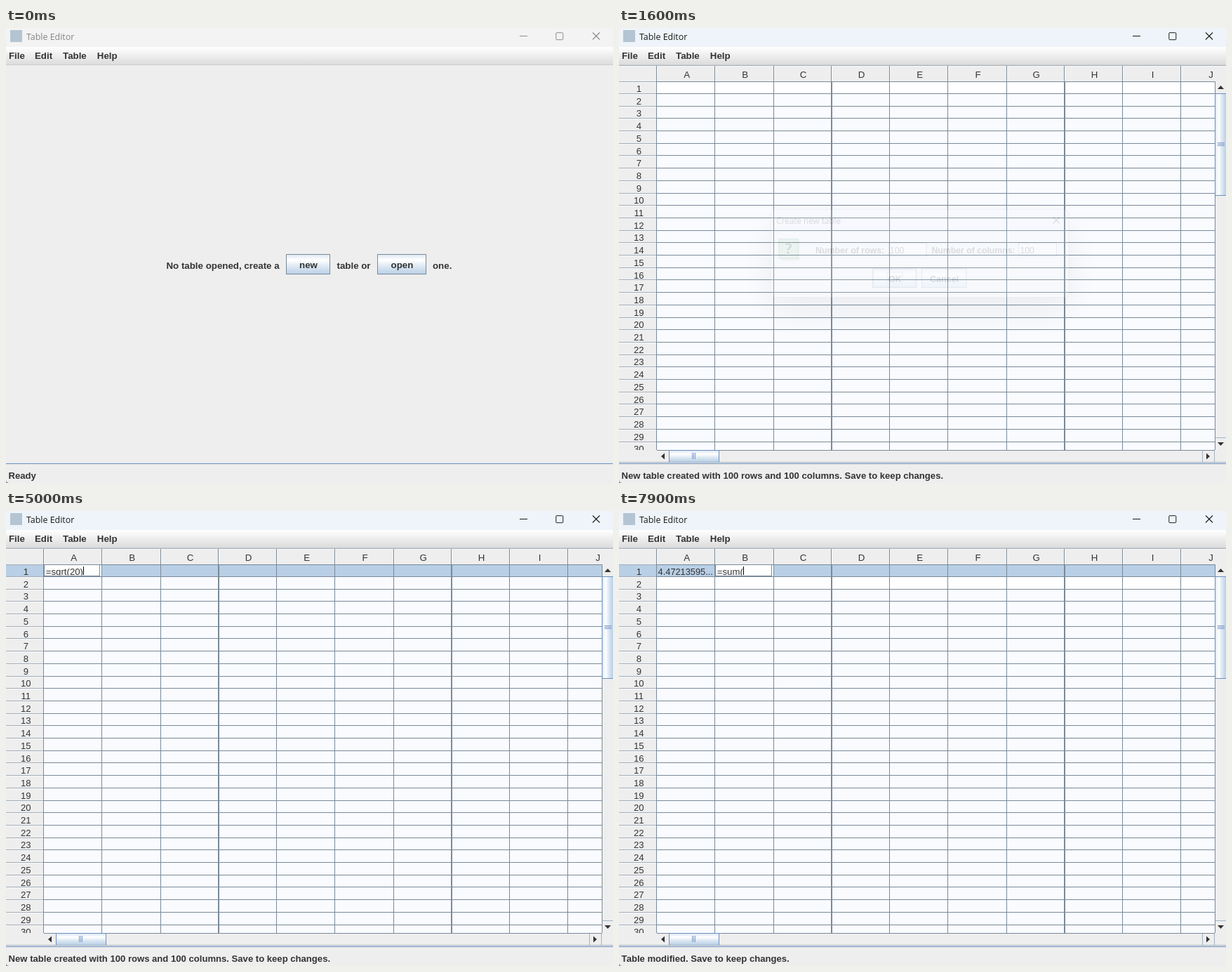
An HTML page with a canvas for the animation above (8000 ms loop, 865 px wide and 648 px high).

```html
<!DOCTYPE html>
<html lang="en">
<head>
<meta charset="utf-8">
<title>Table Editor</title>
<style>
html, body { margin: 0; width: 100%; height: 100%; overflow: hidden; background: #eee; }
canvas { display: block; width: 865px; height: 648px; }
</style>
</head>
<body>
<canvas id="stage" width="865" height="648"></canvas>
<script>
const stage = document.getElementById('stage');
const screen2d = stage.getContext('2d');
const layer = stage.cloneNode().getContext('2d');
let ctx = screen2d;

const LOOP = 8000;
const SANS = '"Liberation Sans", Arial, sans-serif';
const UI = '"Open Sans", "Noto Sans", sans-serif';
const INK = '#333', LINE = '#7a8a99', PANEL = '#eee', SELECT = '#b8cfe5';
const ZOOM = 0.885, ROW = 17.7, LEFT = 53, TOP = 76, RIGHT = 849, BOTTOM = 601;

// Typed text: [time, content, caret shown]
const typingA = [
  [2200, '', true], [2700, '', false], [2900, '=', true], [3200, '=s', true],
  [3600, '=sq', true], [3700, '=sqr', true], [3900, '=sqrt', true], [4200, '=sqrt(', true],
  [4500, '=sqrt(2', true], [4600, '=sqrt(20', true], [5000, '=sqrt(20)', true]
];
const typingB = [
  [6400, '', true], [6900, '', false], [7000, '=', true], [7300, '=s', true],
  [7400, '=su', true], [7600, '=sum', true], [7900, '=sum(', true]
];

// Dialog phases: [time, scale, opacity]
const dialogPhases = [
  [0, 1, 0], [900, 0.947, 0.88], [1000, 0.985, 0.98], [1100, 1, 1],
  [1500, 0.97, 0.5], [1600, 0.947, 0.15], [1700, 1, 0]
];

const at = (list, t) => list.filter(e => e[0] <= t).pop();

function box(x, y, w, h, color) {
  ctx.fillStyle = color;
  ctx.fillRect(x, y, w, h);
}

function frame(x, y, w, h, color) {
  ctx.strokeStyle = color;
  ctx.lineWidth = 1;
  ctx.strokeRect(x + 0.5, y + 0.5, w - 1, h - 1);
}

function text(s, x, y, { size = 13.3, bold = false, font = SANS, color = INK, align = 'left' } = {}) {
  ctx.font = `${bold ? 'bold ' : ''}${size}px ${font}`;
  ctx.fillStyle = color;
  ctx.textAlign = align;
  ctx.fillText(s, x, y);
}

function path(points, color, fill) {
  ctx.beginPath();
  points.forEach(([x, y]) => ctx.lineTo(x, y));
  if (fill) {
    ctx.fillStyle = color;
    ctx.fill();
  } else {
    ctx.strokeStyle = color;
    ctx.lineWidth = 1.1;
    ctx.stroke();
  }
}

function cross(x, y, r, color) {
  path([[x - r, y - r], [x + r, y + r]], color);
  path([[x - r, y + r], [x + r, y - r]], color);
}

function ramp(x0, y0, x1, y1, colors) {
  const g = ctx.createLinearGradient(x0, y0, x1, y1);
  colors.forEach(([p, c]) => g.addColorStop(p, c));
  return g;
}

const gloss = (x0, y0, x1, y1) =>
  ramp(x0, y0, x1, y1, [[0, '#dde8f3'], [0.3, '#fff'], [0.6, '#dde8f3'], [1, SELECT]]);

function button(label, x, y, w, h, { pressed, focus, main } = {}) {
  box(x, y, w, h, pressed ? SELECT : gloss(0, y, 0, y + h));
  frame(x, y, w, h, LINE);
  if (main) frame(x + 1, y + 1, w - 2, h - 2, '#8fa3b8');
  const cx = x + w / 2 + 0.5;
  text(label, cx, y + h / 2 + 5.8, { bold: true, align: 'center' });
  if (focus) {
    const tw = ctx.measureText(label).width + 4;
    frame(Math.round(cx - tw / 2), y + 5, Math.round(tw), h - 10, '#a3b8cc');
  }
}

function chrome(active) {
  box(0, 0, 865, 648, PANEL);
  box(0, 0, 865, 27, active ? '#eef4f9' : '#f3f3f3');
  box(6, 3, 17, 17, '#b4c4d2');
  text('Table Editor', 29, 17, { size: 12.4, font: UI, color: active ? '#1a1a1a' : '#858585' });
  const c = active ? '#1a1a1a' : '#8c8c8c';
  box(732, 11, 11, 1, c);
  ctx.beginPath();
  ctx.roundRect(783.8, 6.7, 10, 10, 1);
  ctx.strokeStyle = c;
  ctx.lineWidth = 1;
  ctx.stroke();
  cross(841, 11.5, 5, c);
  box(0, 27, 865, 25, ramp(0, 27, 0, 52, [[0, '#fff'], [1, '#dcdcdc']]));
  box(0, 52, 865, 1, '#ccc');
  [['File', 4], ['Edit', 41], ['Table', 81], ['Help', 129.8]]
    .forEach(([s, x]) => text(s, x, 44.3, { bold: true }));
}

function footer(status) {
  box(0, 619, 865, 1, '#dfe7f0');
  box(0, 620, 865, 1, '#7392bd');
  text(status, 3.6, 641.7, { size: 13.1, bold: true });
  path([[0, 644], [1, 646.5], [4, 648], [0, 648]], '#8a8a8a', true);
}

function welcome(pressed, focus) {
  const label = (s, x) => text(s, x, 342.7, { bold: true });
  label('No table opened, create a', 228.5);
  button('new', 399, 322, 63, 29, { pressed, focus });
  label('table or', 471.5);
  button('open', 529, 322, 70, 29);
  label('one.', 608);
}

function scrollbars() {
  box(850, TOP, 15, BOTTOM - TOP, PANEL);
  box(849, TOP, 1, BOTTOM - TOP, LINE);
  path([[853, 87], [857.5, 82], [862, 87]], INK, true);
  path([[853, 590], [857.5, 595], [862, 590]], INK, true);
  box(850, 583, 15, 1, '#a3b3c2');
  box(850, 94, 15, 144, gloss(850, 0, 865, 0));
  frame(849, 93, 17, 146, '#6e8fbe');
  box(54, 601, 795, 1, LINE);
  path([[65, 605.5], [60, 610], [65, 614.5]], INK, true);
  path([[837, 605.5], [842, 610], [837, 614.5]], INK, true);
  box(831, 602, 1, 16, '#a3b3c2');
  box(848, 602, 1, 16, '#a3b3c2');
  box(72, 602, 70, 16, gloss(0, 602, 0, 618));
  frame(71, 601, 72, 18, '#6e8fbe');
  for (let i = 0; i < 3; i++) {
    box(853, 163 + 2 * i, 10, 1, '#7f9bcb');
    box(104 + 2 * i, 605, 1, 9, '#7f9bcb');
  }
  box(0, 618, 865, 1, '#a6b2be');
}

const rowY = n => Math.floor(TOP - 0.25 + ROW * n);
// Columns are 93.75 device pixels wide, snapped and then scaled down
const colX = i => Math.round(LEFT + 0.3 + Math.round(93.75 * i) * ZOOM);

function editor(col, [, content, caret]) {
  const x = colX(col) + 1, w = colX(col + 1) - x - 2;
  box(x, TOP + 1, w + 2, 16, '#fff');
  frame(x, TOP, w, 17, LINE);
  ctx.save();
  ctx.beginPath();
  ctx.rect(x + 1, 78, w - 2, 13.4);
  ctx.clip();
  text(content, x + 2.8, 91, { size: 13.2 });
  if (caret) box(Math.round(x + 2.8 + ctx.measureText(content).width), 79, 1, 12, '#000');
  ctx.restore();
}

function table(t) {
  const selected = t < 2200 ? 0 : t < 5300 ? 1 : t < 6400 ? 2 : 1;
  const solved = t >= 5300;
  box(0, 53, 865, 1, '#a9b4bf');
  box(0, 54, 865, 1, '#fafafa');
  box(LEFT, TOP, RIGHT - LEFT, BOTTOM - TOP, '#f9fbff');
  box(LEFT, TOP, RIGHT - LEFT, ROW * (solved ? 2 : 1), '#fff');
  if (selected) box(0, rowY(selected - 1) + 1, RIGHT, 17, SELECT);

  ctx.save();
  ctx.beginPath();
  ctx.rect(0, 53, RIGHT, BOTTOM - 53);
  ctx.clip();
  for (let n = 0; n < 30; n++) {
    const y = n ? rowY(n) : TOP;
    box(0, y, LEFT, 1, '#a2adb8');
    box(LEFT, y, RIGHT - LEFT, 1, LINE);
    if (n + 1 !== selected) box(0, y + 1, LEFT, 1, '#f8f8f8');
    text(n + 1, 28.3, TOP + ROW * n + 15, { size: 13.1, align: 'center' });
  }
  for (let i = 0; i < 10; i++) {
    const x = colX(i);
    box(x, 54, 1, TOP - 54, LINE);
    box(x + 1, 54, 1, TOP - 54, '#fafafa');
    box(x, TOP, i % 4 === 3 ? 2 : 1, BOTTOM - TOP, LINE);
    text('ABCDEFGHIJ'[i], 96.6 + 83 * i, 70.6, { align: 'center' });
  }
  ctx.restore();

  if (solved) text('4.47213595...', 55.6, 90.5, { size: 12.8 });
  if (selected === 2) frame(LEFT, 93, 84, 18, '#6382bf');
  if (t >= 2200 && t < 5300) editor(0, at(typingA, t));
  if (t >= 6400) editor(1, at(typingB, t));
  scrollbars();
}

function field(x) {
  box(x, 306, 58, 21, '#f3f6fa');
  frame(x, 306, 58, 21, LINE);
  text('100', x + 2.3, 322.3, { size: 13 });
}

function dialogBody(pressed, active) {
  const shape = () => {
    ctx.beginPath();
    ctx.roundRect(208, 256, 449, 132.5, 8);
  };
  ctx.save();
  ctx.shadowColor = 'rgba(0,0,0,.38)';
  ctx.shadowBlur = 45;
  ctx.shadowOffsetY = 21;
  shape();
  ctx.fillStyle = PANEL;
  ctx.fill();
  ctx.restore();

  ctx.save();
  shape();
  ctx.clip();
  box(208, 256, 450, 34, active ? '#eff3fa' : '#f3f3f3');
  ctx.restore();
  shape();
  ctx.strokeStyle = '#a4a6a9';
  ctx.lineWidth = 1;
  ctx.stroke();

  text('Create new table', 216.6, 277.6, { size: 12.4, font: UI, color: '#1a1a1a' });
  cross(638, 272.5, 5, '#1a1a1a');

  box(223, 303, 29, 30, '#c4c8c4');
  box(220, 300, 30, 30, '#99cc99');
  frame(220, 300, 30, 30, '#5d8a5d');
  ctx.font = 'bold 22px "DejaVu Sans", sans-serif';
  ctx.textAlign = 'center';
  ctx.lineWidth = 2.5;
  ctx.strokeStyle = '#d5ecd5';
  ctx.strokeText('?', 235, 323);
  ctx.fillStyle = '#0a4d0a';
  ctx.fillText('?', 235, 323);

  text('Number of rows:', 275.6, 322.3, { size: 13.05, bold: true });
  field(385);
  text('Number of columns:', 450.3, 322.3, { size: 12.95, bold: true });
  field(581);
  button('OK', 361, 345, 67, 29, { pressed, focus: true, main: true });
  button('Cancel', 435, 345, 68, 29);
}

// Drawn on its own layer so that the whole window fades as one
function dialog(t) {
  const [, scale, alpha] = at(dialogPhases, t);
  if (!alpha) return;
  const k = (1 - scale) / 0.053;
  ctx = layer;
  ctx.clearRect(0, 0, 865, 648);
  ctx.save();
  ctx.translate(208 + 8 * k, 256 + 2.3 * k);
  ctx.scale(scale, scale);
  ctx.translate(-208, -256);
  dialogBody(t >= 1400 && t < 1500, t >= 1000);
  ctx.restore();
  ctx = screen2d;
  ctx.globalAlpha = alpha;
  ctx.drawImage(layer.canvas, 0, 0);
  ctx.globalAlpha = 1;
}

function draw(t) {
  const ready = t >= 1600;
  chrome(t >= 1500 || (t >= 600 && t < 900));
  if (ready) table(t);
  else welcome(t >= 600 && t < 700, t >= 700);
  footer(!ready ? 'Ready' : t < 5400
    ? 'New table created with 100 rows and 100 columns. Save to keep changes.'
    : 'Table modified. Save to keep changes.');
  dialog(t);
}

const start = performance.now();
function tick() {
  draw((performance.now() - start) % LOOP);
  requestAnimationFrame(tick);
}
tick();
</script>
</body>
</html>
```
